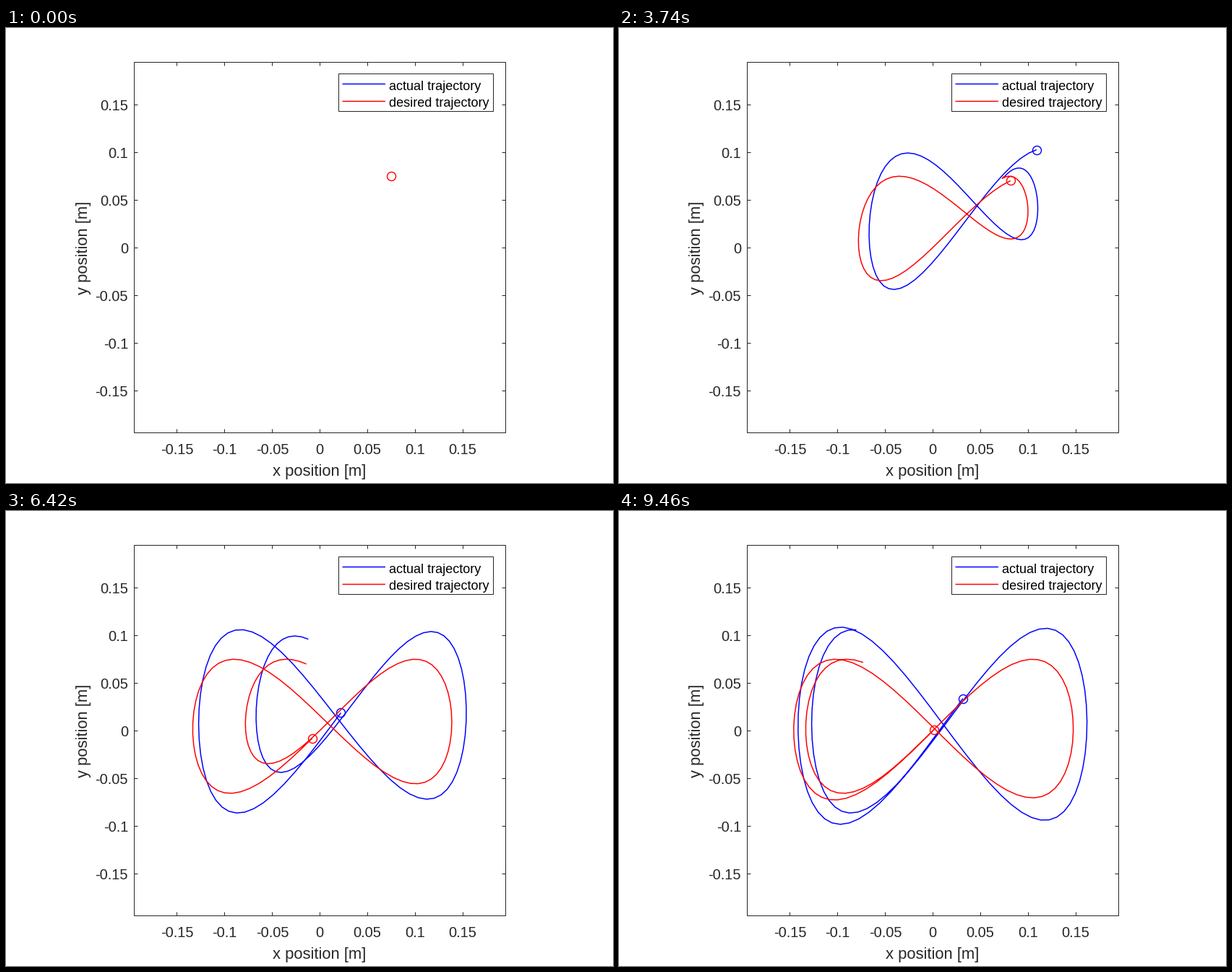
A matplotlib script for the animation above (9500 ms loop, 840 px wide and 630 px high).

```python
import numpy as np
import matplotlib.pyplot as plt
from matplotlib.animation import FuncAnimation
from matplotlib.patches import Rectangle

W, H, DPI = 840, 630, 100
PX = 72 / DPI            # points per pixel
INK = (0.15, 0.15, 0.15)
BLUE, RED = (0, 0, 1), (1, 0, 0)
SCALE = 1317             # pixels per metre
LAST, TAIL = 225, 105    # last sample, trail length in samples
STEP = 0.04              # seconds per sample
START = 0.075            # both coordinates of the starting point

plt.rcParams["font.family"] = "Liberation Sans"


def to_stage(x, y):
    return np.column_stack([434.5 + SCALE * x, 304 - SCALE * y])


t = np.arange(LAST + 1) * STEP
phase = 2 * np.pi * t / 3
decay = np.exp(-t / 2)
grow = 1 - decay


def desired():
    """Figure eight that fades in from the starting point."""
    x = START + grow * (0.15 * np.sin(phase) - START)
    y = START + grow * (0.075 * np.sin(2 * phase) - START)
    return to_stage(x, y)


def actual():
    """Tracked path: drifting centre, overshoot and a growing phase lead."""
    x_mid = 0.009 + 0.095 * decay - 0.029 * decay ** 2
    y_mid = 0.004 + 0.1 * decay - 0.03 * decay ** 2
    y_amp = 0.099 + 0.00075 * t
    x = x_mid + 0.155 * grow * np.sin(phase + 0.14 * (1 - decay ** 2))
    y = y_mid + y_amp * grow * np.sin(2 * phase + 0.28 * grow)
    return to_stage(x, y)


fig = plt.figure(figsize=(W / DPI, H / DPI), dpi=DPI, facecolor="white")
ax = fig.add_axes([0, 0, 1, 1])
ax.set_xlim(0, W)
ax.set_ylim(H, 0)
ax.axis("off")


def stroke(x, y, color=INK, width=1.0, **kw):
    return ax.plot(x, y, color=color, lw=width * PX,
                   solid_capstyle="butt", **kw)[0]


def label(x, y, text, size, color=INK, **kw):
    ax.text(x, y, text, fontsize=size * PX, color=color, va="baseline",
            rotation_mode="anchor", **kw)


def box(x0, y0, x1, y1):
    ax.add_patch(Rectangle((x0, y0), x1 - x0, y1 - y0, fill=False,
                           ec=INK, lw=PX))


# axes box, ticks and labels; whole pixels snap to crisp lines
L, T, R, B = 177, 47, 691, 560
box(L, T, R, B)
for n in range(-3, 4):
    x, y = 434 + 0.05 * SCALE * n, 304 - 0.05 * SCALE * n
    for edge, size in ((B, -5), (T, 5)):
        stroke([x, x], [edge, edge + size])
    for edge, size in ((L, 5), (R, -5)):
        stroke([edge, edge + size], [y, y])
    text = f"{n * 0.05:.2g}"
    label(x + 0.3, 590, text, 20, ha="center")
    label(169, y + 8, text, 20, ha="right")
label(434, 620, "x position [m]", 22, ha="center")
label(113, 304, "y position [m]", 22, ha="center", rotation=90)

# legend
box(460, 63, 674, 115)
for y, base, color, name in ((77.5, 86, BLUE, "actual"),
                             (101.5, 109, RED, "desired")):
    stroke([465.5, 525], [y, y], color, 1.5, snap=False)
    label(529.5, base, f"{name} trajectory", 18, "black", ha="left")

paths = [actual(), desired()]
trails = [stroke([], [], c, 1.5, zorder=z) for c, z in ((BLUE, 3), (RED, 4))]
heads = [stroke([], [], c, 1.5, zorder=z, marker="o", mfc="none",
                ms=12 * PX, mew=1.4 * PX, snap=False)
         for c, z in ((BLUE, 3), (RED, 4))]


def draw(i):
    # 20 ms ticks: hold for 500 ms, then one sample every 40 ms
    k = max(0, (i - 23) // 2)
    for path, trail, head in zip(paths, trails, heads):
        trail.set_data(*path[max(0, k - TAIL):k + 1].T)
        head.set_data(*path[k:k + 1].T)
    heads[0].set_visible(k > 0)   # both circles coincide at the start
    return trails + heads


anim = FuncAnimation(fig, draw, frames=475, interval=20, repeat=True,
                     repeat_delay=0, blit=False)
plt.show()
```
